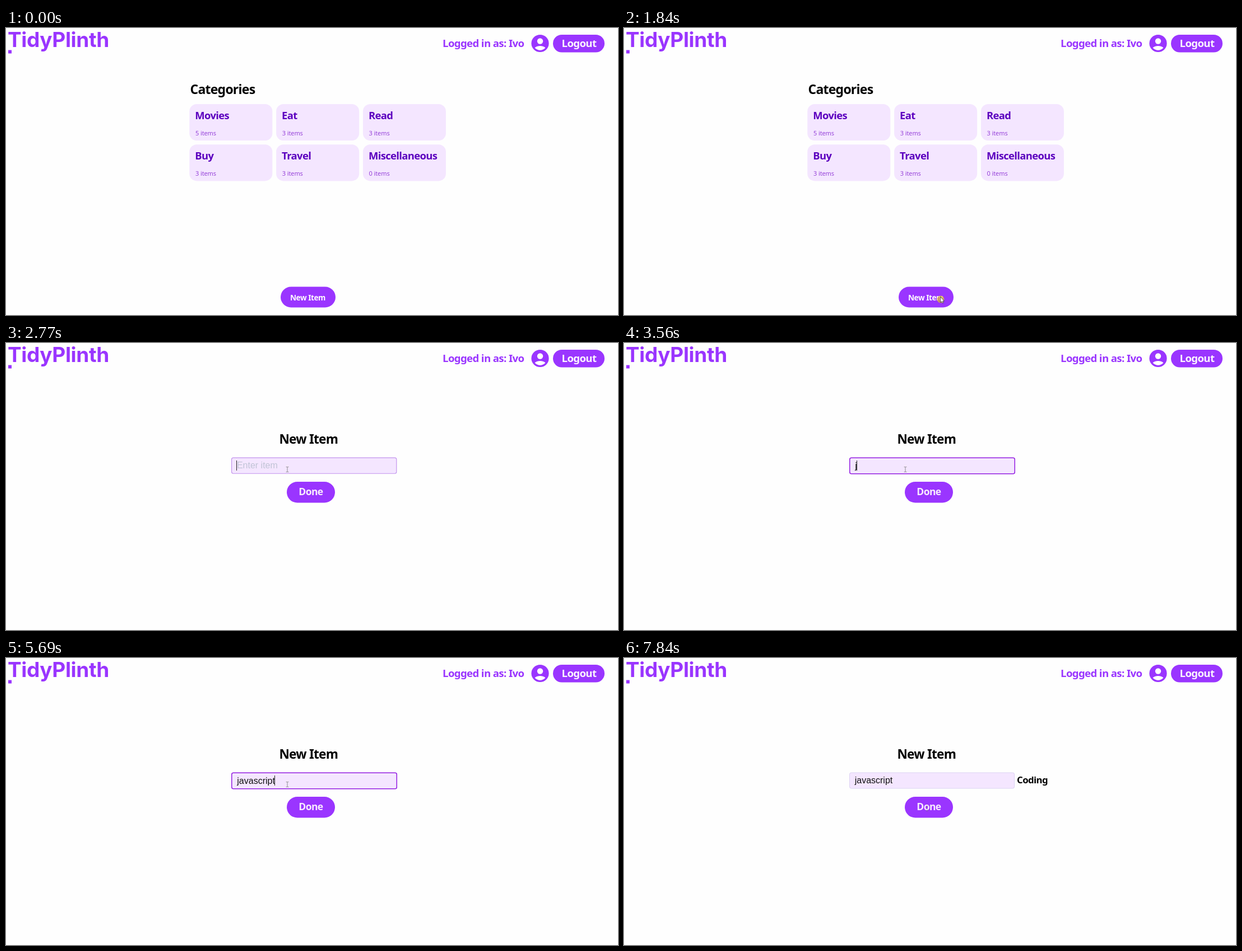
Recreate the animation shown at these times as an HTML page. Size 1092x513 px, loop 8 s.

```html
<!DOCTYPE html>
<html lang="en">
<head>
<meta charset="utf-8">
<title>List app demo</title>
<style>
  html, body { margin: 0; width: 100%; height: 100%; overflow: hidden; background: #fefefe; }
  svg { display: block; width: 100vw; height: 100vh; }
  text { white-space: pre; }
  .bold { font-family: "Noto Sans", "Open Sans", sans-serif; font-weight: 700; letter-spacing: -0.033em; }
  .small { font: 11px "Noto Sans", "Open Sans", sans-serif; letter-spacing: -0.01em; fill: #9642d9; }
  .field { font: 16px "Liberation Sans", Arial, sans-serif; }
  .brand { font: 700 37px Inter, sans-serif; letter-spacing: -0.01em; }
</style>
</head>
<body>
<svg id="stage" viewBox="0 0 1092 513">
  <g id="header"></g>
  <g id="listPage"></g>
  <g id="formPage"></g>
  <g id="pointer">
    <circle id="halo" r="6.5" cx="0.5" cy="4.5" fill="#d9b23c" opacity="0.75"/>
    <path id="arrow" d="M0 0V10.2L2.4 8.1L4 11.4L5.6 10.6L4.1 7.5H7Z" fill="#fff" stroke="#333" stroke-width="0.8"/>
    <path id="beam" d="M-2.3 -4.5H-0.6L0 -4L0.6 -4.5H2.3M0 -4V4M-2.3 4.5H-0.6L0 4L0.6 4.5H2.3" fill="none" stroke-width="0.9"/>
  </g>
</svg>
<script>
const LOOP = 8000;
const PURPLE = '#9a35ff', DEEP = '#5c00bf', PALE = '#f4e6ff';
const $ = id => document.getElementById(id);

function add(parent, tag, attrs, content = '') {
  const node = document.createElementNS('http://www.w3.org/2000/svg', tag);
  for (const key in attrs) node.setAttribute(key, attrs[key]);
  node.textContent = content;
  return parent.appendChild(node);
}
const box = (parent, x, y, width, height, rx, fill) =>
  add(parent, 'rect', { x, y, width, height, rx, fill });
const bold = (parent, x, y, size, fill, content) =>
  add(parent, 'text', { x, y, fill, class: 'bold', 'font-size': size }, content);
const set = (node, attrs) => { for (const key in attrs) node.setAttribute(key, attrs[key]); };
const show = (node, on) => { node.style.display = on ? '' : 'none'; };
const clamp = v => Math.max(0, Math.min(1, v));
const progress = (t, from, to) => clamp((t - from) / (to - from));
const ease = p => p * p * (3 - 2 * p);
const mix = (a, b, p) => a + (b - a) * p;
const within = (t, from, to) => t >= from && t < to;

const header = $('header'), listPage = $('listPage'), formPage = $('formPage');

// Header
add(header, 'text', { x: 3, y: 34, class: 'brand', fill: PURPLE }, 'TidyPlinth');
box(header, 4, 39.5, 6, 6, 0, PURPLE);
bold(header, 779, 34, 18.6, PURPLE, 'Logged in as: Ivo');
add(header, 'circle', { cx: 953, cy: 27.5, r: 15.6, fill: PURPLE });
add(header, 'circle', { cx: 953, cy: 23.5, r: 5.2, fill: '#fff' });
add(header, 'path', { d: 'M943.5 35.3C949 31 957 31 962.5 35.3C957.5 41.2 948.5 41.2 943.5 35.3Z', fill: '#fff' });
box(header, 976, 12, 92, 31.5, 15.7, PURPLE);
bold(header, 991.5, 34, 18.6, '#fbf4ff', 'Logout');

// Category list
bold(listPage, 328.5, 118, 23, '#000', 'Categories');
[['Movies', 5], ['Eat', 3], ['Read', 3], ['Buy', 3], ['Travel', 3], ['Miscellaneous', 0]]
  .forEach(([name, count], i) => {
    const x = 327.3 + (i % 3) * 154.8, y = 136 + Math.floor(i / 3) * 72.2;
    box(listPage, x, y, 148, 65.2, 13, PALE);
    bold(listPage, x + 10, y + 27, 18.4, DEEP, name);
    add(listPage, 'text', { x: x + 10.7, y: y + 55.5, class: 'small' }, count + ' items');
  });
box(listPage, 490, 462.5, 98, 37, 18.5, PURPLE);
bold(listPage, 507, 487, 13.6, '#fff', 'New Item');

// New item form
bold(formPage, 487.5, 180, 22.6, '#000', 'New Item');
const field = add(formPage, 'rect', { rx: 3, fill: PALE });
const entry = add(formPage, 'text', { class: 'field' });
const squiggle = add(formPage, 'path', {
  d: 'M412.5 227.5' + 'l1.5 -1.6l1.5 1.6'.repeat(22), fill: 'none', stroke: '#e8203c', 'stroke-width': 0.9
});
const caret = add(formPage, 'rect', { y: 210, width: 1, height: 18, fill: '#222' });
box(formPage, 501, 248, 86, 37.5, 18.7, PURPLE);
bold(formPage, 522.3, 272.3, 17.5, '#f8ebff', 'Done');
const category = bold(formPage, 701, 224.3, 16.8, '#000', 'Coding');

const OPEN = 1900, FOCUS = 2650, BLUR = 7140, RESULT = 7840;
const CARET_ON = 2600, BLINK = 520;
const WORD = 'javascript';
const KEYS = [3560, 3690, 3960, 4090, 4420, 4630, 4960, 5290, 5550, 5690];
const CLICKS = [[1770, OPEN], [2500, 2690], [7110, 7300]];

function pointerAt(t) {
  if (t < 1150) {
    const p = ease(progress(t, 380, 1150)), q = 1 - p;
    return [mix(1060, 626, p), q * q * 513 + 2 * p * q * 334 + p * p * 451];
  }
  if (t < OPEN) {
    const p = ease(progress(t, 1180, 1630));
    return [mix(626, 564.5, p), mix(451, 480.5, p)];
  }
  if (t < 6600) {
    const p = ease(progress(t, 1930, 2360));
    return [mix(564.5, 502, p), mix(480.5, 226, p)];
  }
  const p = ease(progress(t, 6600, 6840));
  return [mix(502, 541, p), mix(226, 258, p) + 11 * ease(progress(t, 7040, 7110))];
}

function drawField(t) {
  const f = ease(progress(t, FOCUS, FOCUS + 300)) * (1 - ease(progress(t, BLUR, BLUR + 300)));
  const stroke = 1 + 0.5 * f;
  const tint = [[220, 148], [210, 30], [243, 226]].map(([a, b]) => Math.round(mix(a, b, f)));
  set(field, {
    x: 402 + stroke / 2, y: 204.5 + stroke / 2,
    width: 295 + f - stroke, height: 29 + f - stroke,
    stroke: `rgb(${tint})`, 'stroke-width': stroke
  });

  const typed = KEYS.filter(k => t >= k).length;
  entry.textContent = typed ? WORD.slice(0, typed) : 'Enter item';
  set(entry, { x: 411.7 + 0.6 * f, y: 224.2 + 0.6 * f, fill: typed ? '#111' : '#c1c4d6' });

  const caretStart = typed ? KEYS[typed - 1] : CARET_ON;
  const lit = (t - caretStart) % (2 * BLINK) < BLINK;
  set(caret, { x: Math.floor(411.7 + 0.6 * f + (typed ? entry.getComputedTextLength() : 0)) });
  show(caret, within(t, CARET_ON, BLUR) && lit);
  show(squiggle, within(t, 6700, BLUR));
}

function render(t) {
  const form = t >= OPEN;
  show(listPage, !form);
  show(formPage, form);
  if (form) drawField(t);
  show(category, t >= RESULT);

  const [x, y] = pointerAt(t);
  const useBeam = form && y < 275;
  set($('pointer'), { transform: `translate(${x.toFixed(1)} ${y.toFixed(1)})` });
  show($('pointer'), t >= 410);
  show($('arrow'), !useBeam);
  show($('beam'), useBeam);
  set($('beam'), { stroke: y > 248 ? '#6d7a63' : '#777', opacity: t > BLUR ? 0.45 : 0.9 });
  set($('halo'), { cy: useBeam ? 0 : 4.5 });
  show($('halo'), CLICKS.some(([from, to]) => within(t, from, to)));
}

const start = performance.now();
function tick() {
  render((performance.now() - start) % LOOP);
  requestAnimationFrame(tick);
}
tick();
</script>
</body>
</html>
```
